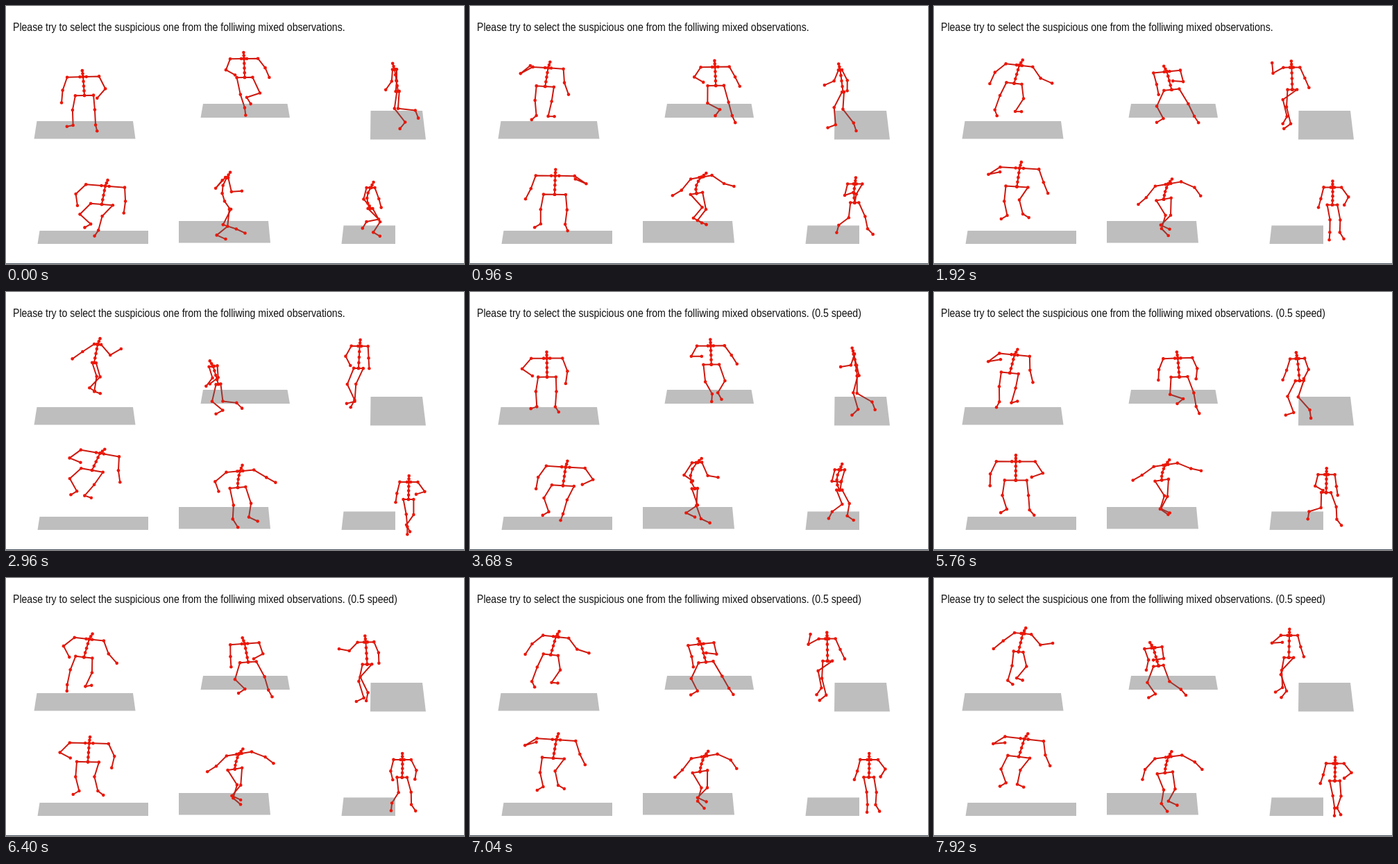
Write an HTML page with a canvas that moves like this. It is 660 px wide and 372 px high and loops after 8 s.

```html
<!DOCTYPE html>
<html lang="en">
<head>
<meta charset="utf-8">
<title>Mixed observations</title>
<style>
html, body { margin: 0; width: 660px; height: 372px; overflow: hidden; background: #fff; }
canvas { display: block; }
p {
  position: absolute; left: 9.6px; top: 22.3px; margin: 0;
  font: 14.1px/14px "Liberation Sans", Arial, sans-serif; color: #111;
  white-space: nowrap; transform: scaleY(1.18); transform-origin: 0 0;
}
</style>
</head>
<body>
<canvas id="stage" width="660" height="372"></canvas>
<p>Please try to select the suspicious one from the folliwing mixed observations. <span id="speed">(0.5 speed)</span></p>
<script>
const LOOP = 8000, STEP = 80, SLOW_START = 3040;
const ctx = document.getElementById('stage').getContext('2d');
const speed = document.getElementById('speed');

// floor: left, right, y of the top edge, then of the bottom edge.
// arm, leg: bone lengths. Every other list is a curve through evenly spread values:
// pelvis place, lean of the spine, half shoulder width (turn), and for each limb
// the direction of its bones in degrees, 0 = down, 90 = right.
const figures = [{
  floor: [44.5, 183, 166, 40.5, 186.5, 191.5], arm: [20, 18], leg: [21, 22, 9],
  x: [113, 109, 109, 116, 127], y: [129, 116, 117, 111, 102],
  lean: [-4, 4, 14, 16, 11], turn: [23, 22, 22, 19, 5],
  arms: [
    [[-19, -63, -54, -52, -57], [-5, 118, 107, -30, -55]],
    [[27, 13, 0, 36, 41], [-41, 25, 11, 70, 120]]],
  legs: [
    [[-11, -7, -7, -26, 18], [2, 5, 2, -20, -9], [-79, -31, 72]],
    [[5, -3, -12, 8, 16], [3, -12, -15, -34, -44], [14, 104, 58]]]
}, {
  floor: [284, 405.5, 141, 280.5, 409, 161], arm: [17, 15], leg: [25, 20, 11],
  x: [344, 352, 354, 341, 306], y: [103, 108, 122, 121, 133],
  lean: [-2, -2, -4, -15, -16], turn: [20, 20, 21, 19, 6],
  arms: [
    [[-21, -35, -24, 17, 17], [61, 107, 0, 10, -38]],
    [[38, 25, 4], [23, 37, 0, -96, -52]]],
  legs: [
    [[12, 0, -2, -25, -13], [18, 45, 73, 27, 50], [7, -50, -62]],
    [[25, 14, 20, 31, 7], [-72, 12, 9, 28, 83], [31, 24, 45]]]
}, {
  floor: [525.5, 600, 151, 525, 605, 192.5], arm: [17, 15], leg: [25, 25, 12], spine: [32],
  x: [565, 528, 508], y: [123, 120, 128, 120, 110],
  lean: [-9, -6, 3], turn: [3, -3, 10, 12, 12],
  arms: [
    [[-4, -30, -15, -62, -29], [-35, -117, -17, -185, -333]],
    [[0, 31, 19, 24, 3], [-5, 25, -28, 25, 3]]],
  legs: [
    [[-8, -22, -28, -3, -22], [38, -4, 20, 14, 25], [-39, -73, -28]],
    [[-4, 2, -16, -55, -25], [84, 36, 43, 12, -4], [21, 10, -75]]]
}, {
  floor: [48.5, 205, 324, 45.5, 205, 343], arm: [20, 17], leg: [22, 21, 10],
  x: [138, 118, 124], y: [286, 272, 272, 260, 257],
  lean: [11, 5, 0, 9, 25], turn: [28],
  arms: [
    [[-47, -24, -24, -59, -54], [8, -27, -8, 105, 68]],
    [[3, 65, 35, 18, -3], [-8, -120, -77, 25, 8]]],
  legs: [
    [[-45, -16, -9, -7, -48], [48, -8, 17, 12, 29], [-60]],
    [[-44, -7, 8, -36, -35], [-15, -15, 3, 13, -41], [-34, 39, 72]]]
}, {
  floor: [249, 378, 310, 249, 381, 341.5], arm: [21, 15], leg: [25, 20, 14],
  spine: [46, 28, 23, 23, 24], hunch: [-9, -2, -1], roll: -0.6,
  x: [323, 328, 334], y: [293, 273, 271, 279, 282],
  lean: [-6, 16, 14, 16, 8], turn: [2, 13, 17, 19, 20],
  arms: [
    [[-42, -27, -54, -38, -50], [140, -36, -60, -47, 20]],
    [[13, 67, 59], [94, 68, 80, 35, 61]]],
  legs: [
    [[-6, 44, 33, 31, 12], [-51, -56, -19, -16, -3], [66, 56, 32]],
    [[-27, 18, -3, -1, 18], [72, -35, -27, -45, -9], [65]]]
}, {
  floor: [486.5, 561, 316.5, 483.5, 561, 343], arm: [17, 13], leg: [22, 18, 11],
  spine: [30, 26, 25], hunch: [-5, 0, 0],
  x: [525, 564, 580], y: [292, 280, 289, 287, 299],
  lean: [1], turn: [6, 12, 13],
  arms: [
    [[-14], [40, 125, 67, -18, -8]],
    [[20, -48, 4, 37, 36], [15, -27, 9, -30, -73]]],
  legs: [
    [[45, -3, -2, 11, 11], [-79, -32, -75, 2, 5], [-31, -10, 0]],
    [[29, 21, 0], [-33, 13, 3, -3, -35], [60, 38, 27]]]
}];

// Smooth curve through evenly spread values, s from 0 to 1
function curve(values, s) {
  const last = values.length - 1;
  if (!last) return values[0];
  const at = i => values[Math.max(0, Math.min(last, i))];
  const i = Math.min(Math.floor(s * last), last - 1), f = s * last - i;
  const slope = j => (at(j + 1) - at(j - 1)) / 2;
  return at(i) + (at(i + 1) - at(i)) * f * f * (3 - 2 * f)
    + slope(i) * f * (1 - f) ** 2 - slope(i + 1) * f * f * (1 - f);
}

const mix = (a, b, s) => [a[0] + (b[0] - a[0]) * s, a[1] + (b[1] - a[1]) * s];

function step([x, y], degrees, length) {
  const a = degrees * Math.PI / 180;
  return [x + length * Math.sin(a), y + length * Math.cos(a)];
}

function limb(root, angles, lengths, s) {
  const joints = [root];
  angles.forEach((a, i) => joints.push(step(joints[i], curve(a, s), lengths[i])));
  return joints;
}

// All bone chains of a figure
function pose({ x, y, lean, turn, spine = [27], hunch = [0], roll = 0.4, arm, leg, arms, legs }, s) {
  const tilt = curve(lean, s), half = curve(turn, s), bulge = curve(hunch, s);
  const pelvis = [curve(x, s), curve(y, s)];
  const neck = step(pelvis, 180 - tilt, curve(spine, s));
  const head = step(neck, 180 - 2 * tilt + 5 * bulge, 9);
  const middle = mix(neck, pelvis, 0.5);
  const bend = [middle[0] + 2 * bulge, middle[1]];
  const back = [0.25, 0.5, 0.75, 1].map(f => mix(mix(neck, bend, f), mix(bend, pelvis, f), f));
  const chains = [[head, mix(head, neck, 0.5), neck, ...back]];
  [-1, 1].forEach((side, i) => {
    const shoulder = step(neck, 90 - tilt * roll, side * half);
    const hip = step(pelvis, 90 - tilt * roll, side * half * 0.57);
    chains.push([neck, mix(neck, shoulder, 0.2), ...limb(shoulder, arms[i], arm, s)]);
    chains.push([pelvis, ...limb(hip, legs[i], leg, s)]);
  });
  return chains;
}

function path(points) {
  ctx.beginPath();
  for (const p of points) ctx.lineTo(...p);
}

function drawFigure(figure, s) {
  const chains = pose(figure, s);
  ctx.strokeStyle = '#cc1a10';
  for (const chain of chains) { path(chain); ctx.stroke(); }

  const [l1, r1, top, l2, r2, bottom] = figure.floor;
  ctx.fillStyle = 'rgba(92, 92, 92, 0.4)';
  path([[l1, top], [r1, top], [r2, bottom], [l2, bottom]]);
  ctx.fill();

  ctx.fillStyle = '#ee1606';
  for (const [x, y] of chains.flat()) {
    ctx.beginPath();
    ctx.arc(x, y, 2.3, 0, 7);
    ctx.fill();
  }
}

function draw(now) {
  const t = Math.floor(now % LOOP / STEP) * STEP, slow = t >= SLOW_START;
  const u = slow ? (t - SLOW_START) / 2 : t;
  // three quarters of the motion are brisk, the last one is calmer
  const s = u < 1960 ? 0.75 * u / 1960 : 0.75 + (u - 1960) / 4000;
  speed.style.visibility = slow ? 'visible' : 'hidden';
  ctx.clearRect(0, 0, 660, 372);
  ctx.lineWidth = 2;
  ctx.lineJoin = 'round';
  for (const f of figures) drawFigure(f, s);
  ctx.fillStyle = '#46505a';
  ctx.fillRect(0, 371, 660, 1);
}

const start = performance.now();
function tick() {
  draw(performance.now() - start);
  requestAnimationFrame(tick);
}
tick();
</script>
</body>
</html>
```
